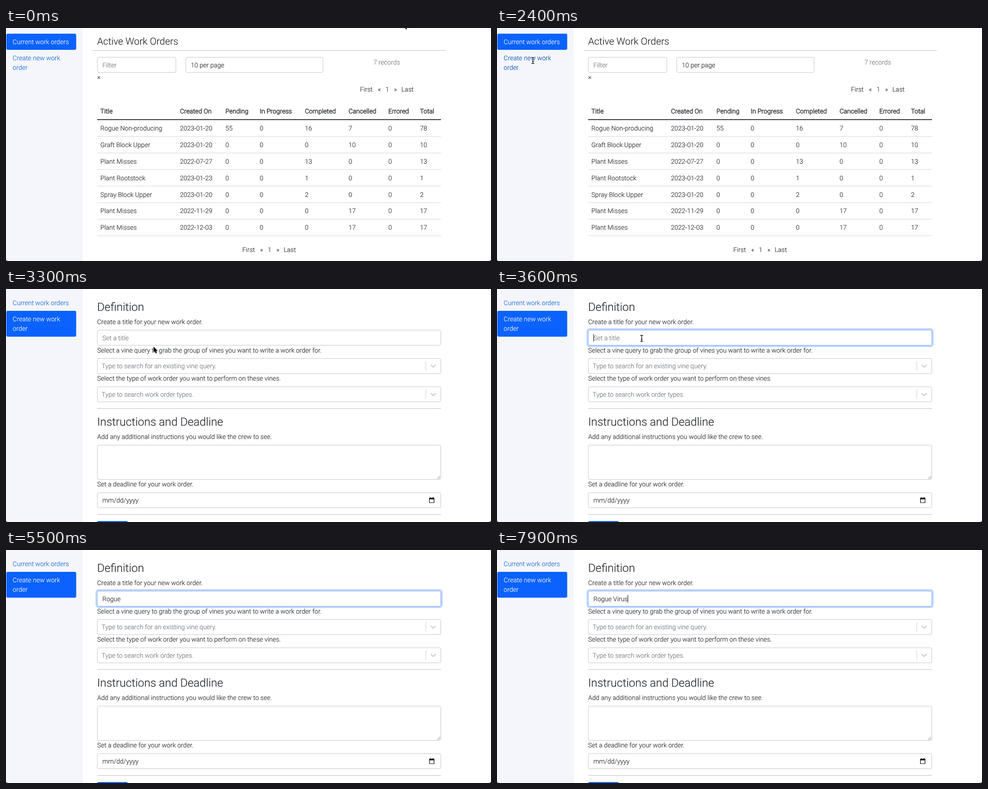
Animation, 1019 px wide and 491 px high, one loop 8000 ms. Source, as an HTML page:

```html
<!DOCTYPE html>
<html lang="en">
<head>
<meta charset="utf-8">
<title>Work orders</title>
<style>
  html, body { margin: 0; width: 100%; height: 100%; overflow: hidden; background: #fff; }
  svg { display: block; width: 1019px; height: 491px; }
  text {
    font: 300 13.6px Roboto, Arial, sans-serif; white-space: pre; text-rendering: geometricPrecision;
    color: #212529; fill: currentColor; stroke: currentColor; stroke-width: .15px;
  }
  .muted { color: #6f757b; }
  .bold { stroke-width: .5px; }
  .box { fill: #fff; stroke: #c3c6ca; }
  .rule { stroke: #babcbe; }
</style>
</head>
<body>
<svg id="stage" viewBox="0 0 1019 491"></svg>
<script>
const LOOP = 8000, STEP = 100;
const LINK = [28, 104, 220], HOVER = [10, 76, 176], WHITE = [255, 255, 255], BLUE = '#0b62ff';
const stage = document.getElementById('stage');

function add(parent, tag, attrs = {}) {
  const el = document.createElementNS('http://www.w3.org/2000/svg', tag);
  set(el, attrs);
  parent.append(el);
  return el;
}
function set(el, attrs) {
  for (const name in attrs) el.setAttribute(name, attrs[name]);
}
// y is the middle of the capital letters
function label(parent, x, y, str, cls = '', size = 13.6) {
  const el = add(parent, 'text', { x, y: y + size * 0.355, class: cls });
  el.style.fontSize = size + 'px';
  el.textContent = str;
  return el;
}
function box(parent, x, y, width, height, attrs = {}) {
  return add(parent, 'rect', { x, y, width, height, rx: 3.2, class: 'box', ...attrs });
}
function line(parent, x1, y1, x2, y2, attrs = {}) {
  return add(parent, 'line', { x1, y1, x2, y2, class: 'rule', ...attrs });
}
const show = (el, on) => el.setAttribute('visibility', on ? 'visible' : 'hidden');
const mix = (a, b, p) => `rgb(${a.map((v, i) => Math.round(v + (b[i] - v) * p))})`;

// Sidebar
add(stage, 'rect', { width: 161, height: 491, fill: '#f4f6fb' });
function tab(y, height, lines) {
  return {
    bg: box(stage, 0.7, y, 146.8, height, { class: '', fill: BLUE }),
    texts: lines.map((str, i) => label(stage, 14.1, y + 17 + i * 20.4, str))
  };
}
const current = tab(12, 34, ['Current work orders']);
const create = tab(46, 54.5, ['Create new work', 'order']);
function paintTab({ bg, texts }, active, link) {
  bg.setAttribute('opacity', active);
  for (const el of texts) el.style.color = mix(link, WHITE, active);
}

// List page
const list = add(stage, 'g');
label(list, 191.5, 27.8, 'Active Work Orders', '', 20.4);
line(list, 182, 47.3, 924, 47.3);
box(list, 192, 61.7, 165, 32);
label(list, 202.5, 77.7, 'Filter', 'muted');
box(list, 377.7, 61.7, 288.3, 32);
label(list, 388.3, 77.7, '10 per page');
label(list, 772, 72, '7 records', 'muted');
label(list, 191.5, 103.5, '×');
for (const [x, y] of [[743.7, 129.6], [496.4, 467.2]])
  [['First', 0], ['«', 37.5], ['1', 53.5], ['»', 71.5], ['Last', 87]]
    .forEach(([str, dx]) => label(list, x + dx, y, str));

const columns = [198.3, 365.4, 460.9, 533.1, 627.9, 719.7, 803.2, 869.8];
const rows = [
  'Title|Created On|Pending|In Progress|Completed|Cancelled|Errored|Total',
  'Rogue Non-producing|2023-01-20|55|0|16|7|0|78',
  'Graft Block Upper|2023-01-20|0|0|0|10|0|10',
  'Plant Misses|2022-07-27|0|0|13|0|0|13',
  'Plant Rootstock|2023-01-23|0|0|1|0|0|1',
  'Spray Block Upper|2023-01-20|0|0|2|0|0|2',
  'Plant Misses|2022-11-29|0|0|0|17|0|17',
  'Plant Misses|2022-12-03|0|0|0|17|0|17'
];
rows.forEach((row, r) => {
  const y = r ? 211.3 + (r - 1) * 34.87 : 175.6;
  row.split('|').forEach((str, c) => label(list, columns[c], y, str, r ? '' : 'bold'));
  if (r) line(list, 191.5, y + 17.2, 914, y + 17.2, { stroke: '#d3d6d9', class: '' });
});
line(list, 191.5, 193.1, 914, 193.1, { stroke: '#212529', 'stroke-width': 1.7, class: '' });

// Form page
const form = add(stage, 'g');
const field = (y, height = 31.8) => box(form, 192, y, 721.5, height);
label(form, 191.5, 38, 'Definition', '', 23.8);
label(form, 191.5, 69.1, 'Create a title for your new work order.');
const ring = box(form, 189.8, 84.5, 725.9, 36, { class: '', rx: 5, fill: 'none', stroke: BLUE, 'stroke-opacity': 0.27, 'stroke-width': 3.4 });
const titleBox = field(86.7);
const hint = label(form, 202.5, 102.7, 'Set a title', 'muted');
const typed = label(form, 202.5, 102.7, '');
const caret = add(form, 'rect', { y: 95, width: 1, height: 15.6, fill: '#000' });

function search(y, prompt, placeholder) {
  label(form, 191.5, y - 33.5, prompt);
  field(y - 15.8);
  label(form, 201.1, y, placeholder, 'muted');
  line(form, 882, y - 10, 882, y + 10, { class: '', stroke: '#ccc' });
  add(form, 'path', { d: `M893 ${y - 2}l4.6 4.6 4.6-4.6`, fill: 'none', stroke: '#c4c4c4', 'stroke-width': 1.8, 'stroke-linecap': 'round' });
}
search(162.2, 'Select a vine query to grab the group of vines you want to write a work order for.', 'Type to search for an existing vine query.');
search(221.8, 'Select the type of work order you want to perform on these vines.', 'Type to search work order types.');
line(form, 191.5, 251.8, 914, 251.8);
label(form, 191.5, 279.9, 'Instructions and Deadline', '', 23.8);
label(form, 191.5, 311.1, 'Add any additional instructions you would like the crew to see.');
field(329, 72.4);
add(form, 'path', { d: 'M906 400l6-6M909.5 400l2.5-2.5', stroke: '#555', 'stroke-width': 0.8 });
label(form, 191.5, 411.6, 'Set a deadline for your work order.');
field(429.2);
label(form, 202.5, 445, 'mm/dd/yyyy');
add(form, 'path', { d: 'M889 440h2v-1.4h1.4v1.4h4.2v-1.4h1.4v1.4h2v10.8h-11zM890.3 443.2v6.6h8.4v-6.6z', fill: '#111', 'fill-rule': 'evenodd' });
line(form, 191.5, 475.2, 914, 475.2);
box(form, 191.5, 489, 64.5, 20, { class: '', fill: BLUE });

// Dark window corners
add(stage, 'path', { d: 'M0 488Q.5 490.5 4 491H0zM1019 488Q1018.5 490.5 1015 491h4z', fill: '#222' });

// Pointer
const arrow = add(stage, 'path', { d: 'M0 0V12.2L2.8 9.6 4.7 14.2 6.8 13.3 4.9 8.9H8.8Z', stroke: '#fff', 'stroke-width': 1.2, 'paint-order': 'stroke' });
const beam = add(stage, 'g', { fill: 'none' });
for (const [stroke, width] of [['#fff', 3], ['#111', 1.3]])
  add(beam, 'path', { d: 'M-3-6.5Q0-6.5 0-5Q0-6.5 3-6.5M0-5V5M-3 6.5Q0 6.5 0 5Q0 6.5 3 6.5M-1.6 2H1.6', stroke, 'stroke-width': width });

const path = [
  [0, 835.5, -11], [100, 835, -30], [300, 835, -30], [400, 834, -5], [900, 365, 198], [1000, 365, 198],
  [1300, 80.3, 69.5], [1700, 75.5, 68.5], [2500, 75.5, 68.5], [3300, 310, 121.5], [3600, 304, 104], [LOOP, 304, 104]
];
function pointerAt(t) {
  const i = path.findIndex(key => key[0] > t);
  const [t0, x0, y0] = path[i - 1], [t1, x1, y1] = path[i];
  const p = (t - t0) / (t1 - t0), e = p * p * (3 - 2 * p);
  return [x0 + (x1 - x0) * e, y0 + (y1 - y0) * e];
}

const OPEN = 2500, FOCUS = 3600;
const title = 'Rogue Virus';
const keyTimes = [4100, 4400, 4600, 4800, 5000, 6900, 7100, 7300, 7500, 7600, 7800];

function draw(t) {
  const onForm = t >= OPEN, focused = t >= FOCUS;
  show(list, !onForm);
  show(form, onForm);

  const [x, y] = pointerAt(t);
  const overTab = x < 147 && y > 46 && y < 100;
  const overInput = onForm && x > 192 && y > 87 && y < 118;
  const isBeam = overTab && x < 115 || overInput;
  const visible = t < keyTimes[0];
  show(arrow, visible && !isBeam);
  show(beam, visible && isBeam);
  set(isBeam ? beam : arrow, { transform: `translate(${x} ${y})` });

  // The tabs swap with a short cross-fade
  const swap = !onForm ? 0 : t < OPEN + STEP ? 0.41 : 1;
  paintTab(current, 1 - swap, LINK);
  paintTab(create, swap, overTab ? HOVER : LINK);

  const count = keyTimes.filter(k => k <= t).length;
  const since = t - (count ? keyTimes[count - 1] : FOCUS);
  typed.textContent = title.slice(0, count);
  titleBox.style.stroke = focused ? '#86b0f8' : '';
  show(ring, focused);
  show(hint, onForm && !count);
  show(caret, focused && since % 1000 < 500);
  caret.setAttribute('x', 202.5 + (count ? typed.getComputedTextLength() : 0));
}

const start = performance.now();
function tick() {
  const t = (performance.now() - start) % LOOP;
  draw(Math.floor(t / STEP) * STEP);
  requestAnimationFrame(tick);
}
tick();
</script>
</body>
</html>
```
